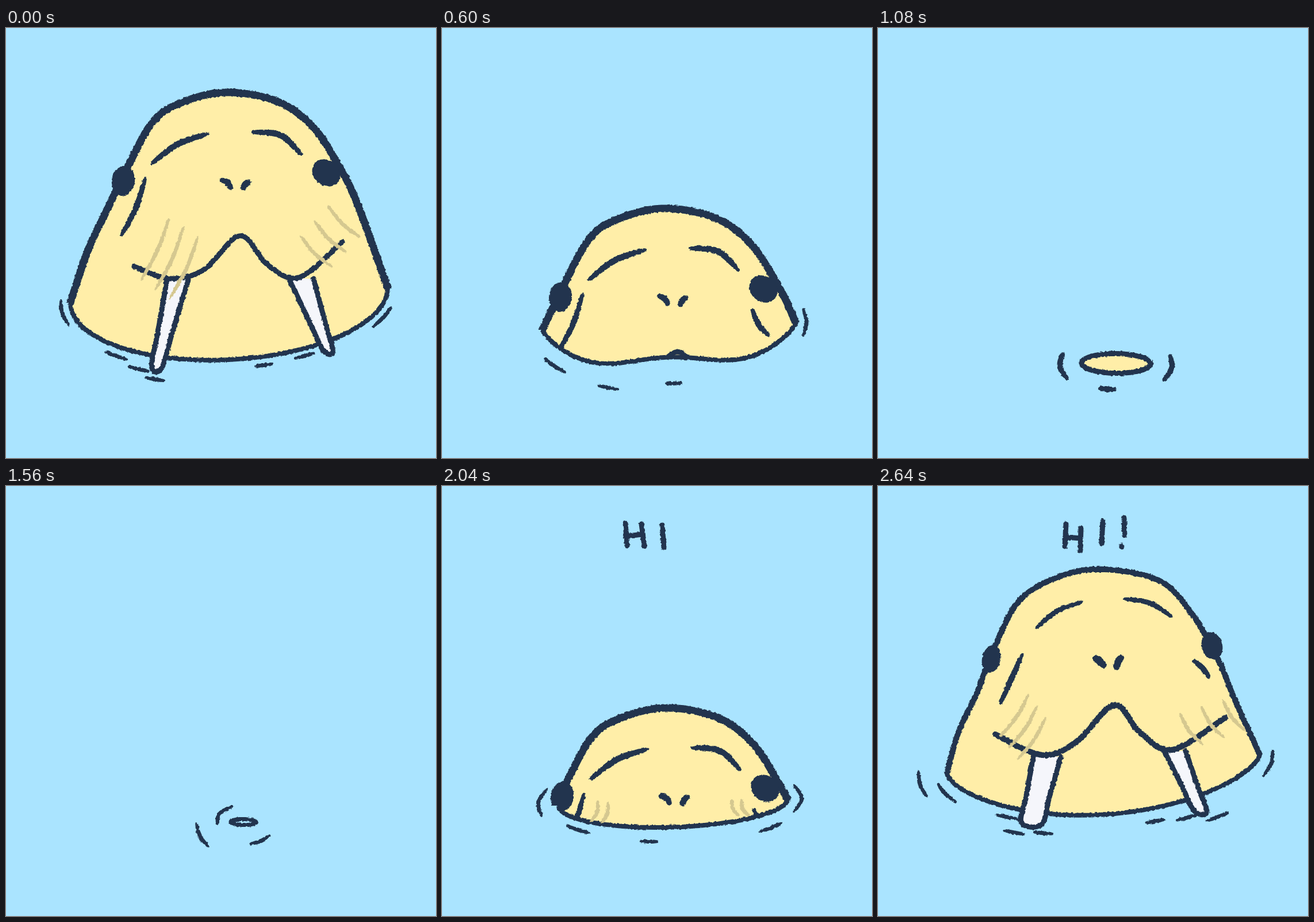
Animation of 748 by 748 pixels, one loop 2.76 s. Source, as an HTML page:

```html
<!DOCTYPE html>
<html lang="en">
<head>
<meta charset="utf-8">
<title>Walrus says hi</title>
<style>
html, body { margin: 0; width: 100%; height: 100%; overflow: hidden; background: #aae4ff; }
svg { display: block; width: 100vw; height: 100vh; }
</style>
</head>
<body>
<svg viewBox="0 0 748 748" role="img" aria-label="HI!">
  <defs>
    <filter id="rough" filterUnits="userSpaceOnUse" x="0" y="0" width="748" height="748" color-interpolation-filters="sRGB">
      <feTurbulence type="fractalNoise" baseFrequency="0.22" numOctaves="2" seed="4" result="noise"/>
      <feDisplacementMap in="SourceGraphic" in2="noise" scale="4" xChannelSelector="R" yChannelSelector="G"/>
    </filter>
  </defs>
  <rect width="748" height="748" fill="#aae4ff"/>
  <g id="scene" filter="url(#rough)" stroke-linecap="round" stroke-linejoin="round"></g>
</svg>
<script>
const INK = '#22344e', SKIN = '#ffeea8', TUSK = '#f5f6fb', HAIR = '#d5c890', SEA = '#aae4ff';
const STEP = 120, COUNT = 23, RAD = Math.PI / 180;
const scene = document.getElementById('scene');

const rows = s => s.split(';').map(r => r.trim().split(/\s+/).map(Number));
const pairs = s => rows(s.replace(/,/g, ';'));
const lerp = (a, b, t) => a + (b - a) * t;
function mix(a, b, t) {
  if (typeof a === 'number') return lerp(a, b, t);
  if (Array.isArray(a)) return a.map((v, i) => mix(v, b[i], t));
  return Object.fromEntries(Object.keys(a).map(key => [key, mix(a[key], b[key], t)]));
}

// Catmull-Rom samples through a list of points
function smooth(p, per = 8) {
  const n = p.length, out = [], at = i => p[Math.max(0, Math.min(n - 1, i))];
  for (let i = 0; i < n - 1; i++) {
    const [a, b, d, e] = [at(i - 1), at(i), at(i + 1), at(i + 2)];
    for (let j = 0; j < per; j++) {
      const t = j / per;
      out.push([0, 1].map(c => b[c] + t / 2 * (d[c] - a[c]
        + t * (2 * a[c] - 5 * b[c] + 4 * d[c] - e[c] + t * (3 * (b[c] - d[c]) + e[c] - a[c])))));
    }
  }
  return [...out, p[n - 1]];
}
const line = p => 'M' + p.map(q => q[0].toFixed(1) + ' ' + q[1].toFixed(1)).join('L');
const path = (d, fill, w = 0) =>
  `<path d="${d}" fill="${fill}"${w ? ` stroke="${INK}" stroke-width="${w}"` : ''}/>`;
const stroke = (p, w) => path(line(p), 'none', w);

// Stroke that thins out at both ends
function brush(p, w, color = INK) {
  const s = smooth(p), n = s.length - 1, up = [], down = [];
  s.forEach(([x, y], i) => {
    const a = s[Math.max(0, i - 1)], b = s[Math.min(n, i + 1)];
    const dx = b[0] - a[0], dy = b[1] - a[1], l = Math.hypot(dx, dy) || 1;
    const h = w / 2 * (0.3 + 0.7 * Math.sqrt(Math.abs(Math.sin(Math.PI * i / n))));
    up.push([x - dy / l * h, y + dx / l * h]);
    down.unshift([x + dy / l * h, y - dx / l * h]);
  });
  return path(line([...up, ...down]) + 'Z', color);
}

// Two ends and how far the middle bulges sideways
function arc([x0, y0, x1, y1, bend]) {
  const dx = x1 - x0, dy = y1 - y0, k = bend / Math.hypot(dx, dy);
  return [[x0, y0], [(x0 + x1) / 2 + dy * k, (y0 + y1) / 2 - dx * k], [x1, y1]];
}
const arcs = (list, w, color) => list.map(a => brush(arc(a), w, color)).join('');

// Waterline: half an ellipse hung between two ends [x0 y0 x1 y1 depth power dent]
function rim([x0, y0, x1, y1, depth, power, dent], deg, gap = 0) {
  const c = Math.cos(deg * RAD), s = Math.sin(deg * RAD), m = Math.abs(s);
  return [
    (x0 + x1) / 2 + ((x1 - x0) / 2 + gap) * c,
    lerp(y0, y1, (c + 1) / 2) + (depth + gap) * Math.sign(s) * m ** power - dent * m ** 8
  ];
}
const sweep = (w, from, to) => Array.from({ length: 41 }, (_, i) => rim(w, lerp(from, to, i / 40)));

// Dashes that follow the waterline, each an angle and a gap
function ripples(w, list, width = 7) {
  const rx = (w[2] - w[0]) / 2;
  return list.map(([deg, gap]) => {
    const s = Math.sin(deg * RAD), c = Math.cos(deg * RAD);
    const half = (14 + 11 * Math.abs(c)) / Math.hypot((rx + gap) * s, (w[4] + gap) * c) / RAD;
    return brush([-half, 0, half].map(d => rim([...w.slice(0, 5), 1, 0], deg + d, gap)), width);
  }).join('');
}

// hairs: first x y, step x y, length x y, count; tusks: root left, right, y, tip x, y, width
const low = {
  dome: pairs('112 478, 142 388, 176 316, 212 241, 254 165, 300 132, 380 112, 470 127, 532 170, 578 238, 612 308, 664 452'),
  water: [112, 478, 664, 452, 112, 1, 0],
  mouth: pairs('223 415, 285 436, 345 420, 407 361, 455 412, 510 434, 585 372'),
  eyes: pairs('204 266 20 26 8, 557 252 26 22 40'),
  brows: pairs('252 237 354 183 9, 427 181 515 221 16'),
  nose: pairs('372 264 392 281 5, 412 283 426 266 4'),
  cheeks: pairs('243 259 200 362 5'),
  hairs: pairs('284 330 25 16 -50 110 3, 512 361 24 -26 56 55 3'),
  tusks: pairs('280 317 438 262 592 17, 492 535 436 560 563 17'),
  pen: [13, 11, 11, 9]
};
const flat = {
  dome: pairs('145 497, 172 437, 203 375, 222 320, 250 272, 320 227, 425 207, 500 236, 552 280, 575 340, 612 410, 636 490'),
  water: [145, 497, 632, 495, 75, 1.1, 0],
  mouth: pairs('188 489, 275 525, 345 508, 435 476, 490 508, 535 523, 620 458'),
  eyes: pairs('208 379 19 30 8, 577 349 21 28 -18'),
  brows: pairs('262 340 355 289 14, 435 281 518 318 12'),
  nose: pairs('372 368 400 390 3, 416 402 426 366 4'),
  cheeks: pairs('245 371 203 465 -3'),
  hairs: pairs('260 398 26 22 -48 98 3, 491 431 39 0 44 70 3'),
  tusks: pairs('249 296 527 266 592 38, 529 567 529 561 563 22'),
  pen: [9, 11, 14, 8]
};
const tall = {
  dome: pairs('120 500, 140 428, 172 360, 205 275, 248 197, 320 156, 395 145, 490 165, 545 221, 590 298, 622 375, 664 467'),
  water: [120, 500, 664, 467, 88, 1.3, 0],
  mouth: pairs('204 432, 285 468, 345 445, 411 381, 455 428, 512 459, 604 403'),
  eyes: pairs('197 301 16 24 12, 581 278 18 24 -15'),
  brows: pairs('274 248 357 201 8, 427 196 512 228 9'),
  nose: pairs('375 297 396 315 1, 414 320 426 295 3'),
  cheeks: pairs('252 291 212 380 0, 548 303 577 335 3'),
  hairs: pairs('262 362 15 20 -50 74 3, 525 395 37 -12 40 55 3'),
  tusks: pairs('270 318 471 267 589 35, 498 535 461 561 568 22'),
  pen: [10, 9, 13, 10]
};
const diving = { ...low, hairs: [], tusks: [], cheeks: [...low.cheeks, [537, 286, 568, 335, -5]] };

// Waterline between the points where the dome enters the sea
function surface(dome) {
  const dry = smooth(dome).filter(([x, y]) => y < 584 - 110 * ((x - 400) / 290) ** 2);
  const [a, b] = [dry[0], dry[dry.length - 1]];
  return [...a, ...b, 588 - (a[1] + b[1]) / 2, 1, 0];
}

// Lifts or sinks a face; tusk tips stay at the surface
function move(f, dx, dy, water) {
  const go = list => list.map(p => [p[0] + dx, p[1] + dy, ...p.slice(2)]);
  const goArc = list => list.map(([a, b, c, d, e]) => [a + dx, b + dy, c + dx, d + dy, e]);
  const dome = go(f.dome);
  return {
    ...f, dome,
    water: water || surface(dome),
    mouth: go(f.mouth), eyes: go(f.eyes), hairs: go(f.hairs),
    brows: goArc(f.brows), nose: goArc(f.nose), cheeks: goArc(f.cheeks),
    tusks: f.tusks.map(([l, r, y, ...tip]) => [l, r, y + dy, ...tip]).filter(t => t[4] - t[2] > 18)
  };
}

function tusk([l, r, y, tx, ty, w]) {
  const a = [l, y], b = [tx - w / 2, ty - 3], c = [tx + w / 2, ty], d = [r, y];
  return path(line(smooth([a, mix(a, b, 0.6), b, c, mix(d, c, 0.6), d])), TUSK, 9);
}
function fan([x, y, sx, sy, lx, ly, n]) {
  return Array.from({ length: n }, (_, i) => {
    const hx = x + sx * i, hy = y + sy * i;
    return [hx, hy, hx + lx, hy + ly, lx < 0 ? 5 : -5];
  });
}

function face(f) {
  const [edge, brow, nose, lip] = f.pen, [x0, y0, x1, y1] = f.water;
  const sea = sweep(f.water, 180, 0), dome = smooth(f.dome);
  const clip = `${line(sea)}L${x1 + 20} ${y1}V0H${x0 - 20}V${y0}Z`;
  const above = s => `<g clip-path="url(#above)">${s}</g>`;
  const eyes = f.eyes.map(([x, y, a, b, turn]) =>
    `<ellipse rx="${a}" ry="${b}" transform="translate(${x} ${y}) rotate(${turn})" fill="${INK}"/>`).join('');
  return `<clipPath id="above"><path d="${clip}"/></clipPath>`
    + above(path(`${line(dome)}V900H${dome[0][0]}Z`, SKIN) + stroke(dome, edge))
    + stroke(sea, 8)
    + f.tusks.map(tusk).join('')
    + above(eyes + stroke(smooth(f.mouth), lip) + arcs(f.hairs.flatMap(fan), 7, HAIR)
      + arcs(f.brows, brow) + arcs(f.nose, nose) + arcs(f.cheeks, 10));
}
const scenery = (f, list) => face(f) + ripples(f.water, list);

// Only the top of the head at the surface, and the rings it leaves
const tip = s => [414 - 60 * s, 583, 414 + 60 * s, 584, 17 * s, 1, 0];
const cap = (w, width, fill = SKIN) => path(line(sweep(w, 0, 360)) + 'Z', fill, width);
const ring = (gap, width) => ripples(tip(1), [[174, gap], [8, gap], [100, gap * 0.75]], width);

const lowRings = pairs('172 17, 132 18, 121 30, 114 42, 78 15, 63 13, 23 16');
const flatRings = pairs('176 47, 169 22, 135 20, 111 48, 106 14, 45 32, 25 18, -13 20');
const tallRings = pairs('172 50, 161 20, 126 14, 120 40, 110 34, 72 22, 61 28, 51 44, 8 23');
const dip = move(diving, 2, 202, [175, 525, 616, 512, 92, 1.5, 38]);
const peek = {
  ...move(diving, 5, 274, [203, 556, 602, 543, 44, 1, 0]),
  hairs: pairs('271 547 18 3 -12 37 2, 504 545 17 0 13 29 2')
};

function floating(f, k) {
  const wobble = [176, 140, 100, 45, 4].map((a, i) => [a + 7 * Math.sin(k * 2.3 + i * 1.9), 22]);
  return scenery(f, wobble);
}

function pose(k) {
  if (k < 4) return scenery(mix(low, flat, k / 3), k % 2 ? flatRings : lowRings);
  if (k === 4) return floating(move(diving, 1, 150), k);
  if (k === 5) return scenery(dip, pairs('146 22, 116 24, 88 8, 0 18'));
  if (k < 9) return floating(move(diving, 4, 270 + 68 * (k - 6)), k);
  if (k < 11) return cap(tip(k === 9 ? 1 : 0.65), 9) + ring(k === 9 ? 38 : 48, 10);
  if (k < 13) return ring(k === 11 ? 62 : 20, 8);
  if (k === 13) {
    const w = [391, 584, 435, 585, 5, 1, 0];
    return cap(w, 7, SEA) + ripples(w, pairs('158 60, 208 25, 57 34'));
  }
  if (k === 14) return cap(tip(1.05), 9) + ring(44, 10);
  if (k < 17) return floating(move(diving, 5, 440 - 88 * (k - 15)), k);
  if (k === 17) return scenery(peek, pairs('184 36, 139 22, 101 25, 42 30, 0 24'));
  if (k < 22) return floating(move(tall, 0, 48 * (22 - k)), k);
  return scenery(tall, tallRings);
}

// Hand lettering: x, y and lean of each upright in two jittery versions
const uprights = [
  pairs('327 66 -2, 353 73 -1, 391 61 -2, 428 55 1'),
  pairs('319 65 3, 347 66 5, 383 68 3, 424 50 2')
];
function greeting(k) {
  const [a, b, i, mark] = uprights[k % 2];
  const bar = ([x, y, lean], h = 39) => stroke([[x, y], [x + lean, y + h]], 9);
  let out = '';
  if (k > 14) out += bar(a) + bar(b) + stroke([[a[0], a[1] + 23], [b[0], b[1] + 18]], 9);
  if (k > 15) out += bar(i);
  if (k > 17) out += bar(mark, 31) + bar([mark[0] - 4, mark[1] + 49, 0], 2);
  return out;
}

let shown = -1;
const start = performance.now();
function draw() {
  const k = Math.floor((performance.now() - start) / STEP) % COUNT;
  if (k !== shown) {
    shown = k;
    scene.innerHTML = pose(k) + greeting(k);
  }
  requestAnimationFrame(draw);
}
draw();
</script>
</body>
</html>
```
